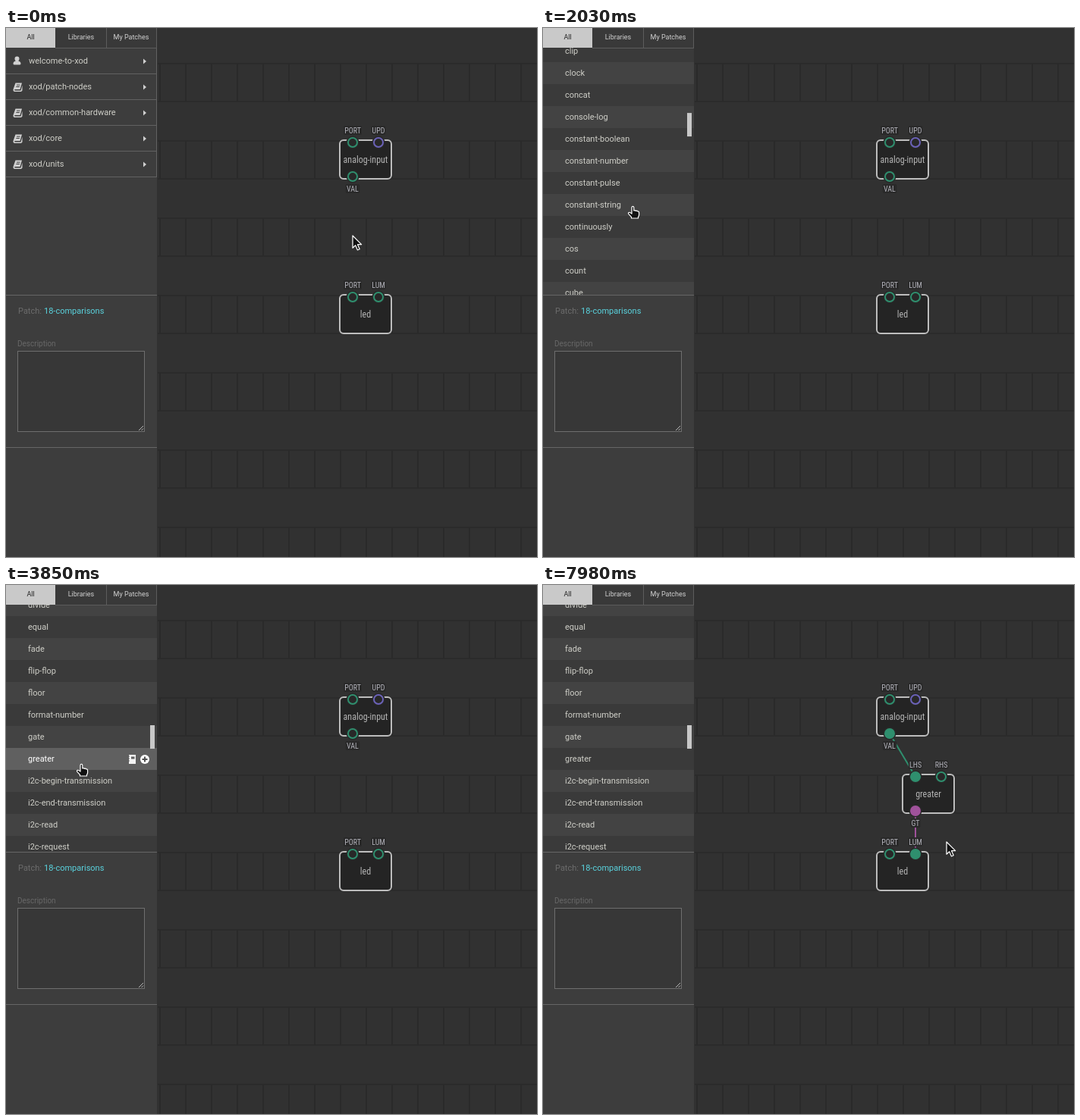
Animation of 700x698 px, one loop 8000 ms. Source, as an HTML page:

```html
<!DOCTYPE html>
<html lang="en">
<head>
<meta charset="utf-8">
<title>Linking nodes</title>
<style>
html, body { margin: 0; width: 100%; height: 100%; overflow: hidden; background: #313131; }
svg { display: block; width: 100vw; height: 100vh; font-family: Roboto, Arial, sans-serif; font-size: 11px; }
.mid { text-anchor: middle; }
.node, .label { font-family: "Roboto Condensed", Roboto, "Liberation Sans Narrow", sans-serif; font-stretch: 75%; text-anchor: middle; }
.node { font-size: 12px; fill: #b4b4b4; }
.label { font-size: 10px; fill: #b0b0b8; }
</style>
</head>
<body>
<svg id="stage" viewBox="0 0 700 698"></svg>
<script>
const LOOP = 8000, STEP = 70, ROW = 29, LIST_TOP = 163;
const GREEN = '#2f8f6e', VIOLET = '#6b62b8', PINK = '#a0529b';
const items = ('abs acos add analog-input analog-output and any asin atan boot buffer ' +
  'cast-boolean-to-number cast-boolean-to-pulse cast-boolean-to-string cast-number-to-boolean ' +
  'cast-number-to-string ceil clip clock concat console-log constant-boolean constant-number ' +
  'constant-pulse constant-string continuously cos count cube debounce-boolean delay digital-input ' +
  'digital-output discretize-2 discretize-3 discretize-4 divide equal fade flip-flop floor ' +
  'format-number gate greater i2c-begin-transmission i2c-end-transmission i2c-read i2c-request i2c-write').split(' ');
const folders = ['welcome-to-xod', 'xod/patch-nodes', 'xod/common-hardware', 'xod/core', 'xod/units'];

const nodes = [
  { name: 'analog-input', x: 440, y: 148 },
  { name: 'greater', x: 474, y: 250, late: true },
  { name: 'led', x: 440, y: 352 }
];
const pins = {
  port: { label: 'PORT', x: 457, y: 151, color: GREEN },
  upd: { label: 'UPD', x: 491, y: 151, color: VIOLET },
  val: { label: 'VAL', x: 457, y: 196, color: GREEN, out: true },
  lhs: { label: 'LHS', x: 491, y: 253, color: GREEN, late: true },
  rhs: { label: 'RHS', x: 525, y: 253, color: GREEN, late: true },
  gt: { label: 'GT', x: 491, y: 298, color: PINK, out: true, late: true },
  ledPort: { label: 'PORT', x: 457, y: 355, color: GREEN },
  lum: { label: 'LUM', x: 491, y: 355, color: GREEN }
};
const links = [
  { from: 'val', to: 'lhs', start: 5950, end: 6580, open: ['lhs', 'rhs', 'ledPort', 'lum'] },
  { from: 'gt', to: 'lum', start: 7070, end: 7560, open: ['port', 'upd', 'rhs', 'ledPort', 'lum'] }
];

// [time, x, y]
const cursorPath = [
  [0, 457, 274], [420, 138, 152], [490, 138, 152], [950, 119, 236], [3360, 119, 236],
  [3710, 100, 237], [3920, 100, 237], [4480, 610, 282], [4760, 542, 278], [4830, 508, 274],
  [5110, 484, 248], [5530, 459, 205], [5600, 459, 205], [5810, 458, 198], [5880, 458, 198],
  [6440, 501, 254], [6510, 501, 254], [6930, 493, 300], [7000, 493, 300], [7490, 493, 358],
  [7560, 493, 358], [7840, 527, 343], [7980, 532, 339]
];
const scrollPath = [[0, 0], [910, 0], [1540, 350], [2520, 930], [3430, 1195]];

const linear = k => k;
const smooth = k => k * k * (3 - 2 * k);
function at(path, t, ease) {
  const i = path.findIndex(p => p[0] > t);
  if (i < 0) return path[path.length - 1].slice(1);
  const a = path[i - 1], b = path[i], k = ease((t - a[0]) / (b[0] - a[0]));
  return a.slice(1).map((v, j) => v + (b[j + 1] - v) * k);
}

const rect = (x, y, w, h, fill, more = '') => `<rect x="${x}" y="${y}" width="${w}" height="${h}" fill="${fill}" ${more}/>`;
const path = (d, more = '') => `<path d="${d}" ${more}/>`;
const text = (x, y, s, fill, more = '') => `<text x="${x}" y="${y}" fill="${fill}" ${more}>${s}</text>`;
const circle = (x, y, r, more) => `<circle cx="${x}" cy="${y}" r="${r}" ${more}/>`;
const line = (a, b, color) => path(`M${a.x} ${a.y}L${b.x} ${b.y}`, `stroke="${color}" stroke-width="2"`);

function grid() {
  let d = '';
  for (let y = 47; y < 698; y += 102) {
    d += `M200 ${y}H700M200 ${y + 50}H700`;
    for (let x = 203; x < 700; x += 34) d += `M${x} ${y}v50`;
  }
  return path(d, 'stroke="#2a2a2a" stroke-width="1.6" fill="none"');
}

const userIcon = path('M14.5 37.5a3 3 0 0 1 3 3q0 2-1.3 3.1q3.3 .6 3.3 3.4q0 1.5-1.5 1.5h-7q-1.500 0-1.500-1.500q0-2.800 3.300-3.400q-1.300-1.100-1.300-3.100a3 3 0 0 1 3-3z', 'fill="#d0d0d0"');
const bookIcon = y => `<g transform="translate(9 ${y - 5})">` +
  path('M3.500 0H12L9.500 8.500H2.500Q1.500 9.500 3 10H10.500L12.500 3V10L11 11.500H2Q0 11 .5 8.500Z', 'fill="#d0d0d0"') +
  path('M5 2.700H9.500M4.400 5H8.800', 'stroke="#3d3d3d" stroke-width="1"') + '</g>';

function folder(name, i) {
  const y = 43.5 + i * 34;
  return rect(0, y - 16.5, 199, 34, '#3d3d3d') +
    path(`M0 ${y + 17}H199M198.500 ${y - 17}V${y + 17}`, 'stroke="#626262"') +
    (i ? bookIcon(y) : userIcon) + text(30, y + 3.5, name, '#cfcfc8') +
    path(i === 3 ? `M181 ${y - 3}l4 3.500l-4 3.500z` : `M181 ${y - 3}l4 3.500l-4 3.500z`, 'fill="#d0d0d0"');
}

function item(name, i) {
  const y = LIST_TOP + i * ROW;
  return rect(0, y, 199, ROW, i % 2 ? '#3a3a3a' : '#434343') + text(29, y + 18, name, '#cfcfc8');
}

function hoverRow(i) {
  const y = LIST_TOP + i * ROW;
  return rect(0, y, 199, ROW, '#606060') + text(29, y + 18, items[i], '#fff') +
    rect(162, y + 9, 9, 12, '#f4f4f4') + rect(165, y + 11.5, 4.5, 3, '#606060') +
    path(`M161 ${y + 11}h2M161 ${y + 14}h2M161 ${y + 17}h2`, 'stroke="#606060"') +
    circle(183, y + 15, 6, 'fill="#fff"') +
    path(`M179.500 ${y + 15}h7M183 ${y + 11.5}v7`, 'stroke="#505050" stroke-width="2"');
}

function sidebar() {
  const tab = (x, s, fill) => text(x, 15, s, fill, 'class="mid" font-size="9"');
  return rect(0, 0, 199, 698, '#3d3d3d') + `<g clip-path="url(#listClip)"><g id="list">` +
    folders.slice(0, 4).map(folder).join('') + `<g id="units">${folder(folders[4], 4)}</g>` +
    `<g id="items">${items.map(item).join('')}<g id="hover"></g></g></g>` +
    rect(190, 0, 6, 31, '#c8c8c8', 'id="thumb"') + '</g>' +
    rect(0, 0, 199, 26, '#393939') + rect(0, 0, 65, 26, '#c9c9c9') +
    path('M65 26.500H199M132.500 0V26M198.500 0V26', 'stroke="#5c5c5c"') +
    tab(32.5, 'All', '#222') + tab(99, 'Libraries', '#d0d0d0') + tab(165, 'My Patches', '#d0d0d0') +
    path('M0 352.500H199M0 553.500H199', 'stroke="#666"') +
    text(16, 377, 'Patch:', '#6c6c6c') + text(50, 377, '18-comparisons', '#5ad3de') +
    text(15, 420, 'Description', '#686868', 'font-size="10"') +
    rect(15.5, 426.5, 167, 106, '#373737', 'stroke="#6e6e6e"') +
    path('M175 531l6-6M178.500 531l2.500-2.500', 'stroke="#b8b8b8"');
}

const nodeBody = n => `<g ${n.late ? 'class="late"' : ''}>` +
  rect(n.x, n.y, 68, 51, '#242424', `rx="5" stroke="#bdbdbd" stroke-width="2" id="${n.name}"`) +
  text(n.x + 34, n.y + 30, n.name, '#b4b4b4', 'class="node"') + '</g>';

const pinRing = (p, id = '') => circle(p.x, p.y, 8.5, 'fill="#282828"') +
  circle(p.x, p.y, 6, `fill="#282828" stroke="${p.color}" stroke-width="2" ${id}`);

function pin([id, p]) {
  const y = p.y + (p.out ? 16 : -16), w = p.label.length * 5.5 + 2;
  return `<g ${p.late ? 'class="late"' : ''}>` + rect(p.x - w / 2, y - 6, w, 12, '#292929', 'rx="2"') +
    text(p.x, y + 4, p.label, '#b0b0b8', 'class="label"') + pinRing(p, `id="${id}"`) + '</g>';
}

const ghost = '<g id="ghost" opacity=".75">' + rect(-34, -25.5, 68, 51, '#242424', 'rx="5" stroke="#bdbdbd" stroke-width="2"') +
  text(0, 4.5, 'greater', '#b4b4b4', 'class="node"') +
  pinRing({ x: -17, y: -22, color: GREEN }) + pinRing({ x: 17, y: -22, color: GREEN }) +
  pinRing({ x: -17, y: 22, color: PINK }) + '</g>';

const arrow = path('M0 0V16.200L3.700 12.800L6.400 19L9.200 17.800L6.500 11.700H11.600Z',
  'id="arrow" fill="#111" stroke="#fff" stroke-width="1.200" stroke-linejoin="round"');
const hand = path('M-2 1Q-2-.6-.6-.6Q.8-.6 .8 1V5Q2.600 4 3.400 5.400Q5 4.700 5.700 6Q7.600 5.600 7.600 7.700V10.500Q7.600 12 6.500 13.300V15H-2.500V13.300L-6.200 9.300Q-7 7.800-5.500 7.300Q-4.300 7-2 9Z',
  'id="hand" fill="#111" stroke="#fff" stroke-width="1.200" stroke-linejoin="round"');

const stage = document.getElementById('stage');
stage.innerHTML = '<defs><clipPath id="listClip"><rect y="26" width="199" height="326"/></clipPath></defs>' +
  rect(0, 0, 700, 698, '#313131') + grid() + nodes.map(nodeBody).join('') + '<g id="links"></g>' +
  Object.entries(pins).map(pin).join('') + '<g id="halos"></g>' + sidebar() + ghost +
  `<g id="cursor">${arrow}${hand}</g>`;

const $ = id => document.getElementById(id);
const show = (el, on) => el.setAttribute('display', on ? 'inline' : 'none');
const move = (el, x, y) => el.setAttribute('transform', `translate(${x.toFixed(1)} ${y.toFixed(1)})`);
const between = (t, a, b) => t >= a && t < b;

function drawList(t, y) {
  const open = t >= 630, scroll = at(scrollPath, t, linear)[0];
  const still = between(t, 700, 910) || between(t, 1470, 1680) || between(t, 3430, 4830);
  const row = Math.floor(((t < 3920 ? y : 237) + scroll - LIST_TOP) / ROW);
  move($('list'), 0, -scroll);
  show($('units'), !open);
  show($('items'), open);
  show($('thumb'), open);
  $('thumb').setAttribute('y', 28 + scroll * .1314);
  $('hover').innerHTML = still && row >= 0 ? hoverRow(row) : '';
}

function halo(p, x, y) {
  const over = Math.hypot(x - p.x, y - p.y) < 14;
  return circle(p.x, p.y, 11.5, 'fill="none" stroke="#a8a8a8" stroke-width="7" opacity=".78"') +
    (over ? circle(p.x, p.y, 7, 'fill="#a9b5af"') : '');
}

function drawLinks(t, x, y) {
  const done = links.filter(l => t >= l.end), live = links.find(l => between(t, l.start, l.end));
  $('links').innerHTML = done.map(l => line(pins[l.from], pins[l.to], pins[l.from].color)).join('');
  const full = done.flatMap(l => [l.from, l.to]);
  for (const id in pins) $(id).setAttribute('fill', full.includes(id) ? pins[id].color : '#282828');
  if (!live) return $('halos').innerHTML = '';
  const p = pins[live.from], end = { x: x - 4, y: y - 3 };
  $('halos').innerHTML = circle(p.x, p.y, 11.5, 'fill="none" stroke="#3d8797" stroke-width="7" opacity=".92"') +
    circle(p.x, p.y, 3.5, `fill="${p.color}"`) + live.open.map(id => halo(pins[id], x, y)).join('') +
    line(p, end, p.color) + circle(end.x, end.y, 3, `fill="${p.color}"`);
}

function draw(time) {
  const t = Math.floor((time % LOOP) / STEP) * STEP;
  const [x, y] = at(cursorPath, t, smooth), pointing = between(t, 420, 3990);
  drawList(t, y);
  drawLinks(t, x, y);
  document.querySelectorAll('.late').forEach(el => show(el, t >= 4830));
  $('analog-input').setAttribute('stroke', between(t, 5530, 5740) ? '#e4e4e4' : '#bdbdbd');
  show($('ghost'), between(t, 3990, 4830));
  move($('ghost'), x, y);
  move($('cursor'), x, y);
  show($('arrow'), !pointing);
  show($('hand'), pointing);
}

const start = performance.now();
function tick() {
  draw(performance.now() - start);
  requestAnimationFrame(tick);
}
tick();
</script>
</body>
</html>
```
